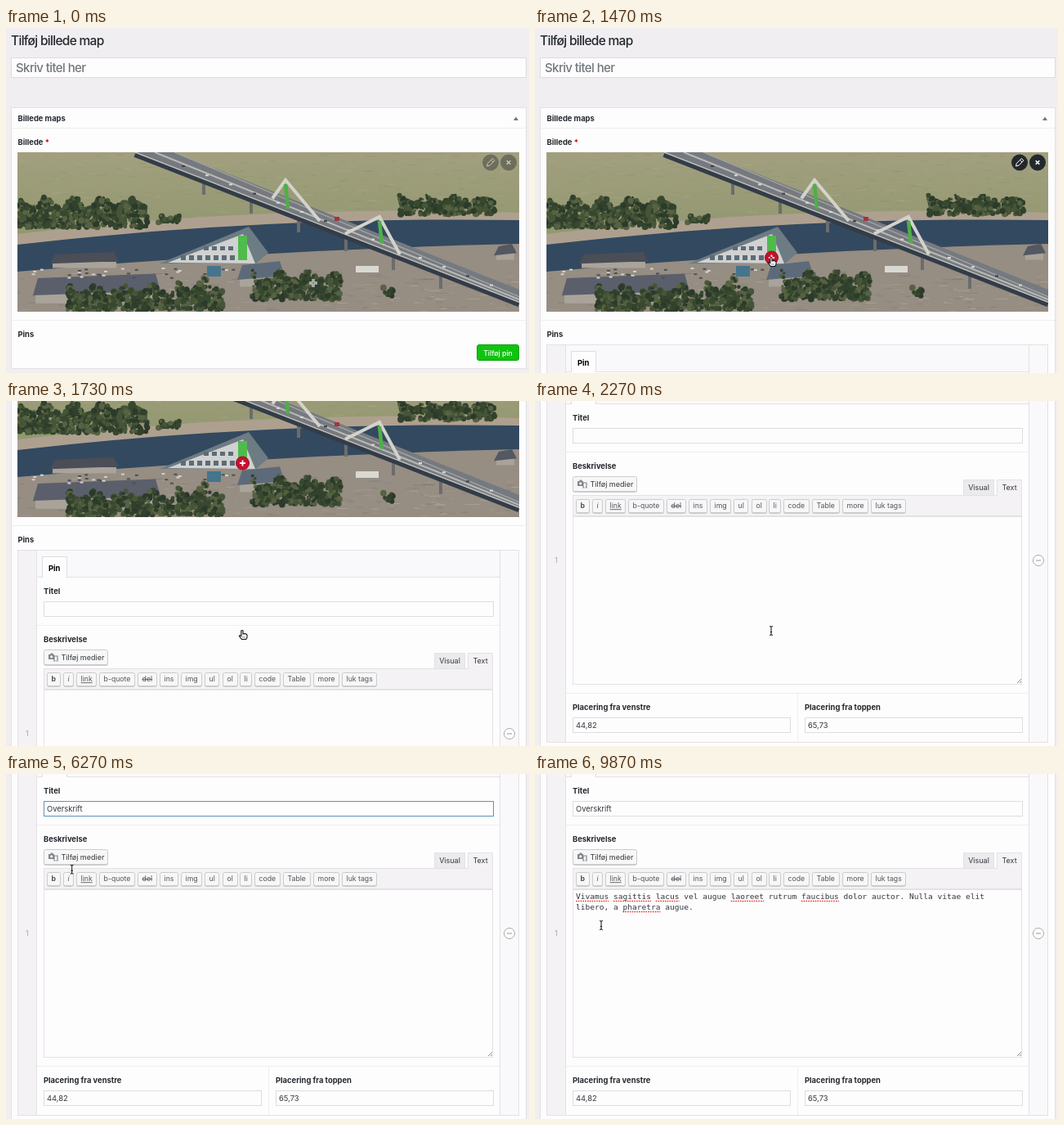
These frames come from a looping animation (640x422 px, 9.94 s). An HTML page:

```html
<!DOCTYPE html>
<html lang="da">
<head>
<meta charset="utf-8">
<title>Tilføj billede map</title>
<style>
html, body { margin: 0; width: 100%; height: 100%; overflow: hidden; background: #f0eef1; }
svg { display: block; width: 640px; height: 422px; }
text { font-family: Inter, Roboto, sans-serif; font-size: 9.4px; fill: #32373c; white-space: pre; }
.bold { font-weight: 700; fill: #23282d; }
.h1 { font-size: 15.5px; font-weight: 500; letter-spacing: -.045em; fill: #23282d; }
.hint { font-size: 15px; font-weight: 500; letter-spacing: -.04em; fill: #72777c; }
.small { font-size: 8.7px; fill: #50555a; }
.medium { font-size: 9px; }
.mid { text-anchor: middle; }
.mono { font: 9.55px "DejaVu Sans Mono", monospace; }
</style>
</head>
<body>
<script>
const LOOP = 9940, SCROLL = 417, WHITE = '#fefdfe', LINE = '#e3e1e4';

const rect = (x, y, w, h, fill, stroke = 'none', extra = '') =>
  `<rect x="${x}" y="${y}" width="${w}" height="${h}" fill="${fill}" stroke="${stroke}" ${extra}/>`;
const box = (x, y, w, h, fill = WHITE, stroke = '#ddd', extra = '') =>
  rect(x + .5, y + .5, w - 1, h - 1, fill, stroke, extra);
const text = (x, y, s, cls = '', extra = '') => `<text x="${x}" y="${y}" class="${cls}" ${extra}>${s}</text>`;
const label = (x, y, s) => text(x, y, s, 'bold');
const path = (d, stroke, width = 1, fill = 'none') =>
  `<path d="${d}" stroke="${stroke}" stroke-width="${width}" fill="${fill}"/>`;
const shape = (d, fill) => `<path d="${d}" fill="${fill}"/>`;
const circle = (x, y, r, fill, stroke = 'none', width = 1) =>
  `<circle cx="${x}" cy="${y}" r="${r}" fill="${fill}" stroke="${stroke}" stroke-width="${width}"/>`;
const button = (x, y, w, h) => box(x, y + 1, w, h, '#ccc', '#ccc', 'rx="2"') + box(x, y, w, h, '#f7f7f7', '#ccc', 'rx="2"');

let seed = 7;
const random = () => (seed = seed * 16807 % 2147483647) / 2147483647;
const pick = list => list[Math.floor(random() * list.length)];
const repeat = (n, draw) => Array.from({ length: n }, (_, i) => draw(i)).join('');

// Everything below a curve across the photo
const band = (left, mid, right, fill) => shape(`M14 ${left}Q321 ${mid} 628 ${right}V347H14Z`, fill);

const flecks = (n, y, h, colors) => repeat(n, () =>
  rect(14 + random() * 610, y + random() * h, 3 + random() * 12, 1, pick(colors), 'none', 'opacity=".4"'));

// Rounded clumps of foliage, tallest in the middle of each clump
const trees = (x, y, w, h) => repeat(w * h / 11, () => {
  const u = random(), top = .35 * Math.abs(Math.sin(u * w / 11));
  return circle(x + u * w, y + h * (top + (1 - top) * random()), 1.5 + random() * 2.5,
    pick(['#2b3a2a', '#38482f', '#465537', '#31412d', '#566242']));
});

const house = (x, y, w, h, roof) => rect(x, y + h * .6, w, h * .5, '#a9a39a')
  + shape(`M${x - 3} ${y + h * .75}l6 ${-h * .75}L${x + w - 3} ${y - h * .2}l6 ${h * .75}Z`, roof);

const pylon = (x, y, left, right, drop) =>
  path(`M${x - left} ${y + drop * .45}L${x} ${y}l${right} ${drop}`, '#d3d3cb', 4)
  + path(`M${x} ${y + 5}l3 ${drop * .6}`, '#4fae4a', 4.5);

function bridge() {
  const along = (x, stroke, width, y = 152) => path(`M${x} ${y}L628 ${y + 332 - 152 - (x - 182) * .14}`, stroke, width);
  return repeat(6, i => rect(240 + i * 58, 186 + i * 23, 4, 18, '#6b6d6c'))
    + along(158, '#333c48', 8, 154)
    + shape('M158 152H206L628 320V336Z', '#767a80')
    + along(158, '#c2c1bb', 1.4) + along(182, '#b9b9b4', 2) + along(206, '#a5a8a5', 1.2)
    + repeat(14, i => rect(215 + i * 29, 168 + i * 11.2, 4, 2, i % 3 ? '#d9d9d5' : '#3b4047'))
    + rect(402, 231, 6, 5, '#a3353a');
}

function photo() {
  const scene = rect(14, 152, 614, 195, 'url(#field)')
    + flecks(260, 152, 80, ['#b5ac8d', '#7f8d62', '#8b9468', '#a8a382'])
    + band(252, 215, 226, '#aea08f') + band(265, 230, 235, '#33495f') + band(298, 271, 264, '#968d83')
    + flecks(220, 298, 48, ['#c5bbae', '#6c6f68', '#b1a698', '#7b8069'])
    + trees(14, 204, 160, 40) + trees(480, 203, 118, 25) + trees(185, 226, 28, 12)
    + house(57, 277, 78, 15, '#4b4e57') + house(36, 306, 150, 28, '#5a5f6b') + house(600, 267, 22, 15, '#535861')
    + shape('M188 288L297 243L321 275L306 288Z', '#6d7b83') + shape('M198 287L290 252L305 288Z', '#d0d2d1')
    + repeat(7, i => rect(214 + i * 10, 278, 6, 6, '#5d6b75')) + repeat(4, i => rect(242 + i * 10, 267, 6, 5, '#5d6b75'))
    + rect(284, 254, 11, 30, '#4fbb4c') + rect(246, 291, 17, 13, '#44758d') + rect(428, 291, 28, 8, '#d9d9d3')
    + house(286, 290, 52, 24, '#5d6a79')
    + repeat(30, () => rect(20 + random() * 260, 293 + random() * 12, 4, 2, pick(['#d2d0c9', '#4a5058'])))
    + trees(75, 312, 130, 34) + trees(208, 305, 57, 40) + trees(300, 294, 110, 38) + trees(460, 314, 14, 14)
    + bridge() + pylon(342, 186, 16, 42, 50) + pylon(457, 231, 42, 25, 46);
  return `<g clip-path="url(#frame)">${scene}</g>`;
}

function header() {
  return text(6, 21, 'Tilføj billede map', 'h1')
    + box(6, 36, 631, 25) + text(12, 54, 'Skriv titel her', 'hint')
    + box(6, 97, 631, 320, WHITE, LINE, 'id="panel"')
    + path('M6 122.5H636M6 357.5H636', '#eee')
    + label(14.5, 113.5, 'Billede maps') + shape('M621 113h6l-3 -4.5Z', '#72777c')
    + label(14.5, 142.5, 'Billede <tspan fill="#d00">*</tspan>')
    + photo()
    + `<g id="tools">${circle(593, 164.5, 10, '#23282d') + circle(615, 164.5, 10, '#23282d')
      + path('M588.5 169l.8 -3.4l6 -6l2.6 2.6l-6 6ZM593.5 161.4l2.6 2.6', '#fff')
      + path('M612.7 162.2l4.6 4.6m0 -4.6l-4.6 4.6', '#fff', 1.6)}</g>`
    + `<g id="pin">${circle(289.5, 281, 8, '#c8102e', '#8f1626') + path('M286 281h7m-3.5 -3.5v7', '#fff', 1.8)}</g>`
    + label(14.5, 377.5, 'Pins')
    + `<g id="add">${box(576, 387, 52, 20, '#0fc40f', '#0aa00a', 'rx="2.5"')
      + text(602, 400.5, 'Tilføj pin', 'small mid', 'style="fill:#fff;font-weight:500"')}</g>`;
}

const TAGS = ['b', 'i', 'link', 'b-quote', 'del', 'ins', 'img', 'ul', 'ol', 'li', 'code', 'Table', 'more', 'luk tags'];
const STYLE = { b: 'font-weight:700', i: 'font-style:italic', link: 'text-decoration:underline',
  del: 'text-decoration:line-through' };

function toolbar() {
  const pen = document.createElement('canvas').getContext('2d');
  pen.font = '8.7px Inter, Roboto, sans-serif';
  let x = 50;
  return TAGS.map(tag => {
    const w = pen.measureText(tag).width + 11.2, left = Math.round(x);
    x += w + 3;
    return button(left, 120, Math.round(w), 17)
      + text(left + w / 2, 131.3, tag, 'small mid', `style="${STYLE[tag] || ''}"`);
  }).join('');
}

const CHAR = 5.748;
const LINES = ['Vivamus sagittis lacus vel augue laoreet rutrum faucibus dolor auctor. Nulla vitae elit',
  'libero, a pharetra augue.'];
const MISSPELT = /Vivamus|sagittis|lacus|laoreet|faucibus|pharetra/g;

const lorem = () => LINES.map((line, i) => text(50, 153 + i * 13, line, 'mono')
  + [...line.matchAll(MISSPELT)].map(m => `<path d="M${50 + m.index * CHAR} ${155.5 + i * 13}h${m[0].length * CHAR}"
    stroke="#e33" stroke-width="1.4" stroke-dasharray="1.6 1.2"/>`).join('')).join('');

// The pin form, laid out in scrolled coordinates
function form() {
  return box(14, -30, 614, 448, '#f9f8fa', LINE) + rect(15, -29, 23, 446, '#f4f2f5')
    + rect(38, 3, 566, 414, WHITE)
    + path('M37.5 -29V417M604.5 -29V417M38 3.5H604', LINE)
    + path('M44.5 4V-21.5H74.5V4', '#ddd', 1, WHITE)
    + text(52, -4.5, 'Pin', 'bold', 'style="fill:#000"')
    + text(26, 197.5, '1', 'mid', 'style="fill:#aaa"')
    + circle(616, 195, 6.5, WHITE, '#aaa') + path('M613 195h6', '#999')
    + path('M38 62.5H604M38 357.5H604M321.5 358V417', '#eee')
    + label(46, 23.5, 'Titel') + box(46, 33, 551, 19, WHITE, '#ddd', 'id="titleBox"') + text(50, 45.5, '', '', 'id="title"')
    + label(46, 82.5, 'Beskrivelse')
    + button(46, 92, 79, 19) + text(67.5, 105.3, 'Tilføj medier', 'medium')
    + shape('M52 98h2l1 -1.5h2l1 1.5h1v6h-7z', '#82878c') + circle(55.7, 100.8, 1.6, '#f7f7f7')
    + path('M60.5 106h-1.5V100H63V106h-1.5', '#82878c', 1.2)
    + box(524, 96, 38, 20, '#ebeaec', LINE) + text(543, 108.7, 'Visual', 'medium mid')
    + box(46, 141, 550, 206, WHITE, LINE) + box(46, 115, 550, 26, '#f4f2f5', LINE)
    + path('M565.5 116V96.5H595.5V116', LINE, 1, '#f4f2f5') + text(580.5, 108.7, 'Text', 'medium mid')
    + toolbar()
    + path('M590 345l5 -5M593 345l2 -2', '#777', .8)
    + label(46, 377.5, 'Placering fra venstre') + box(46, 387, 267, 19) + text(50, 400, '44,82')
    + label(330, 377.5, 'Placering fra toppen') + box(330, 387, 267, 19) + text(334, 400, '65,73')
    + `<g id="lorem">${lorem()}</g>` + rect(0, 0, 1, 11, '#222', 'none', 'id="caret"');
}

const CROSS = 'M-5 0H5M0 -5V5';
const BEAM = 'M-2 -5.5Q0 -5.5 0 -4Q0 -5.5 2 -5.5M0 -4V4M-2 5.5Q0 5.5 0 4Q0 5.5 2 5.5M-1.2 1.5H1.2';
const HAND = 'M-1.2 0Q0 -1 1 0V4Q5 3 6 5V8L4.8 10.5H-.6L-3.6 6.6Q-3.6 5 -1.2 6.6Z';

document.body.innerHTML = `<svg viewBox="0 0 640 422">
  <defs>
    <linearGradient id="field" x2="0" y2="1"><stop stop-color="#a29f7f"/><stop offset=".5" stop-color="#929870"/></linearGradient>
    <clipPath id="frame"><rect x="14" y="152" width="614" height="195"/></clipPath>
  </defs>
  <g id="page">${header()}<g id="row" transform="translate(0 ${SCROLL})">${form()}</g></g>
  <g id="mouse">
    <g id="ring">${circle(0, 0, 14, 'rgba(255,255,255,.15)', '#111', 2.2) + circle(0, 0, 12, 'none', 'rgba(255,255,255,.7)', 1.5)}</g>
    <g id="cross">${path(CROSS, '#eee', 3) + path(CROSS, '#666', 1)}</g>
    <g id="hand">${path(HAND, '#111', 1.1, '#fff') + path('M1 7v2M3 7v2', '#333', .6)}</g>
    <g id="beam">${path(BEAM, '#fff', 2.4) + path(BEAM, '#222', 1.1)}</g>
  </g></svg>`;

const $ = id => document.getElementById(id);
const show = (id, on) => $(id).style.display = on ? '' : 'none';
const move = (id, x, y) => $(id).setAttribute('transform', `translate(${x} ${y})`);
const ease = (t, a, b) => {
  const p = Math.min(1, Math.max(0, (t - a) / (b - a)));
  return p * p * (3 - 2 * p);
};

// Pointer moves: start time and destination
const MOVES = [[0, 289, 281], [2950, 57, 42], [5700, 83, 124], [6500, 79, 166], [8300, 81, 185]];
const pointer = t => MOVES.reduce(([x, y], [start, toX, toY]) => {
  const p = ease(t, start, start + 700);
  return [x + (toX - x) * p, y + (toY - y) * p];
}, [376, 312]);

const TITLE = 'Overskrift', KEY_START = 4500, KEY_STEP = 135;
const PINNED = 930, FOCUS = 3850, BODY = 8150, PASTE = 9300;

function draw(t) {
  const added = t >= PINNED;
  move('page', 0, -Math.round(SCROLL * ease(t, 1463, 2005)));
  $('tools').setAttribute('opacity', .4 + .6 * ease(t, 0, 200));
  $('panel').setAttribute('height', added ? 780 : 319);
  show('pin', added);
  show('row', added);
  show('add', !added);

  const keys = Math.min(TITLE.length, Math.max(0, Math.floor((t - KEY_START) / KEY_STEP) + 1));
  $('title').textContent = TITLE.slice(0, keys);
  const inTitle = t >= FOCUS && t < BODY, pasted = t >= PASTE;
  $('titleBox').setAttribute('stroke', inTitle ? '#5b94b5' : '#ddd');
  show('lorem', pasted);

  const lastKey = keys ? KEY_START + (keys - 1) * KEY_STEP : FOCUS;
  const since = t - (pasted ? PASTE : inTitle ? lastKey : BODY);
  show('caret', t >= FOCUS && since % 1000 < 500);
  if (inTitle) move('caret', 50 + (keys ? $('title').getComputedTextLength() : 0), 36.5);
  else move('caret', pasted ? 50 + LINES[1].length * CHAR : 50, pasted ? 157 : 144);

  move('mouse', ...pointer(t));
  show('mouse', t < KEY_START || t >= 5990);
  show('ring', t >= 700 && t < 920 || t >= 3800 && t < 4000);
  show('cross', !added);
  show('hand', added && t < 2000);
  show('beam', t >= 2000);
}

function tick(now) {
  draw(now % LOOP);
  requestAnimationFrame(tick);
}
draw(0);
requestAnimationFrame(tick);
</script>
</body>
</html>
```
